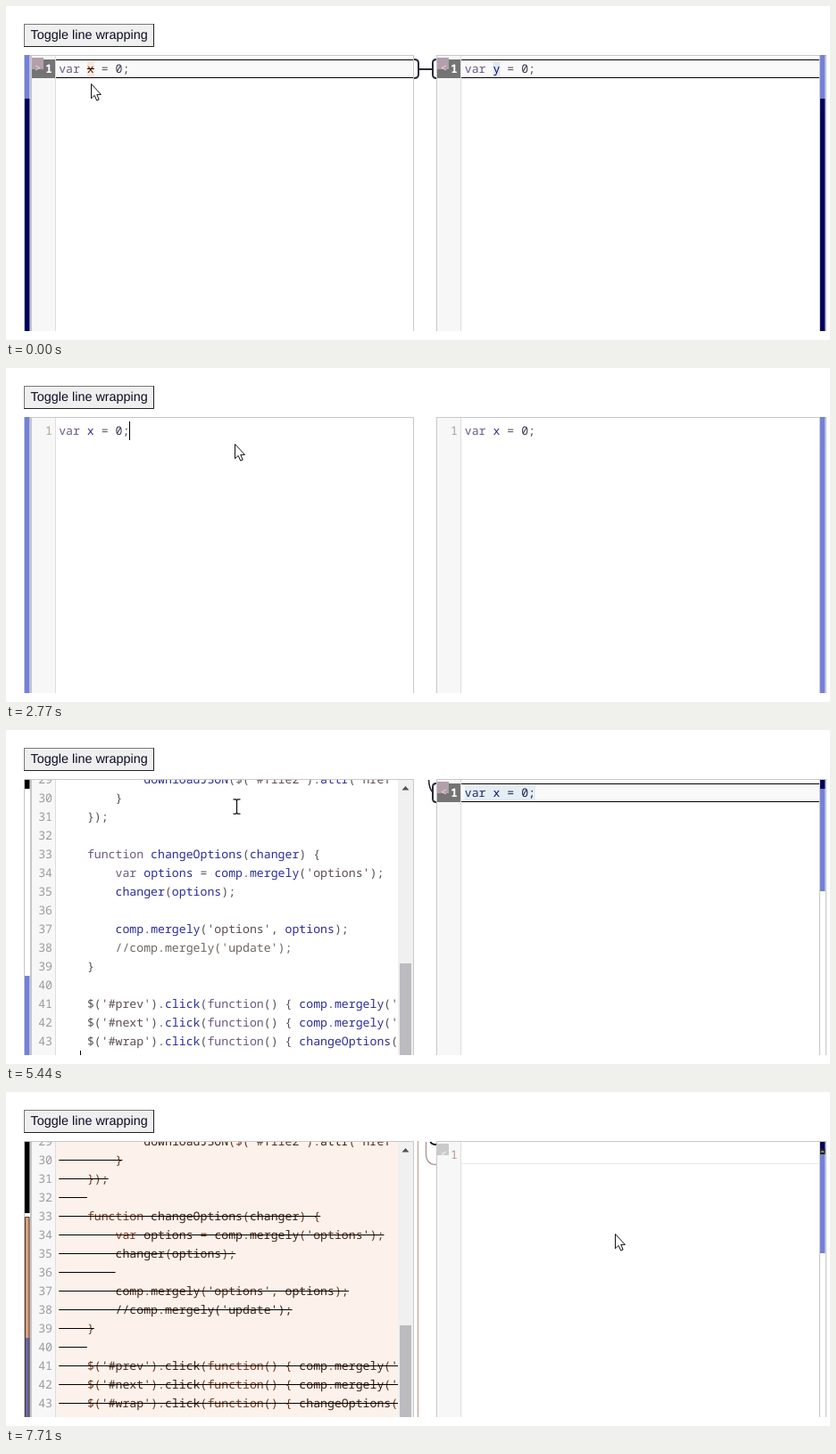
An HTML page for the animation above (8000 ms loop, 923 px wide and 375 px high).

```html
<!DOCTYPE html>
<html lang="en">
<head>
<meta charset="utf-8">
<title>Merge editor</title>
<style>
  html, body { margin: 0; width: 100%; height: 100%; overflow: hidden; background: #fff; }
  svg { display: block; }
  text { white-space: pre; text-rendering: geometricPrecision; }
  .code { font: 13.2px "Noto Sans Mono", monospace; }
  .bold { font-weight: 700; }
  .ui { font: 14.4px "Liberation Sans", Arial, sans-serif; }
</style>
</head>
<body>
<svg id="stage" width="923" height="375" viewBox="0 0 923 375">
  <defs>
    <clipPath id="view"><rect width="923" height="365"/></clipPath>
    <clipPath id="panes"><rect x="29" y="56" width="410" height="309"/></clipPath>
  </defs>
  <rect x="20.5" y="20.5" width="145" height="25" fill="#efefef" stroke="#777"/>
  <path d="M20 45.5H165.5V20" fill="none" stroke="#222"/>
  <text class="ui" x="27.6" y="37" fill="#0c0c24">Toggle line wrapping</text>
  <g id="scene" clip-path="url(#view)"></g>
  <g id="pointer" stroke="#111" stroke-linejoin="round">
    <path id="arrow" fill="#fff" d="M0 0V16.3L3.7 12.9 6.2 18.6 8.7 17.5 6.3 11.9H11Z"/>
    <path id="beam" fill="none" stroke-width="1.3" d="M-4 -8.2H-1.2L0 -7 1.2 -8.2H4M0 -7V7M-4 8.2H-1.2L0 7 1.2 8.2H4"/>
    <g id="hand" stroke-width="1.2">
      <path fill="#fff" d="M-1.5 13V2Q-1.5 .2 .3 .2 2.2 .2 2.2 2V8Q4.4 6.6 5.6 8.6 7.8 7.6 8.8 9.6 11.6 9 11.6 12V16Q11.6 19 9.6 22.4H.8Q-1 18.5 -4.8 14.8 -6.4 11.4 -3.6 11.4Z"/>
      <path fill="none" d="M2.2 8V12M5.6 9V12.4M8.8 10V12.8"/>
    </g>
  </g>
</svg>
<script>
const LOOP = 8000, CHAR = 7.92, ROW = 21, LEFT = 59.2, RIGHT = 513.8;
const BLUE = '#7480da', NAVY = '#00005c', DARK = '#2a2a3a', FADED = '#b39c9c';
const scene = document.getElementById('scene');
const parts = [];

const SOURCE = [
  "            downloadJSON($('#file2').attr('href'",
  "        }",
  "    });",
  "    ",
  "    function changeOptions(changer) {",
  "        var options = comp.mergely('options');",
  "        changer(options);",
  "        ",
  "        comp.mergely('options', options);",
  "        //comp.mergely('update');",
  "    }",
  "    ",
  "    $('#prev').click(function() { comp.mergely('prev');",
  "    $('#next').click(function() { comp.mergely('next');",
  "    $('#wrap').click(function() { changeOptions(",
  "   "
];
const rows = SOURCE.map((code, i) => ({ code, n: 29 + i, y: 45 + i * ROW }));

const PLAIN = { comment: '#6f6560', string: '#5c4c50', keyword: '#6a5a82', number: '#383a4c', name: '#2c2c98', sign: '#55505c' };
const MUTED = { ...PLAIN, name: '#5a1c10' };
const ADDED = { keyword: '#28285e', number: '#20204c', name: '#101060', sign: '#28284c' };
const REMOVED = { comment: '#3c2418', string: '#4c2c20', keyword: '#7c3c20', number: '#3c2418', name: '#3c2014', sign: '#6c3820' };

const rect = (x, y, w, h, fill) => `<rect x="${x}" y="${y}" width="${w}" height="${h}" fill="${fill}"/>`;
const line = (d, color, w = 2) => `<path d="${d}" fill="none" stroke="${color}" stroke-width="${w}"/>`;

// Adds markup that is visible during the given [from, to) spans.
function part(spans, markup) {
  const el = document.createElementNS('http://www.w3.org/2000/svg', 'g');
  el.innerHTML = markup;
  scene.append(el);
  parts.push({ el, spans });
}

function kind(token) {
  if (token.startsWith('//')) return 'comment';
  if (token[0] === "'") return 'string';
  if (/^(var|function)$/.test(token)) return 'keyword';
  if (/^\d/.test(token)) return 'number';
  return /^\w/.test(token) ? 'name' : 'sign';
}

function code(x, y, source, colors) {
  const body = source.trimStart();
  const start = x + (source.length - body.length) * CHAR;
  const spans = (body.match(/\/\/.*|'[^']*'?|\w+|\s+|[^\w\s]/g) || [])
    .map(t => `<tspan fill="${colors[kind(t)]}">${t}</tspan>`).join('');
  return `<text class="code" x="${start}" y="${y + 15}">${spans}</text>`;
}

const number = (x, y, n, fill, bold = '') =>
  `<text class="code ${bold}" x="${x}" y="${y + 15}" text-anchor="end" fill="${fill}">${n}</text>`;

const pane = (x, w) =>
  rect(x, 55, w, 320, '#c8c8c8') + rect(x + 1, 56, w - 2, 319, '#fff') +
  rect(x + 1, 56, 26, 319, '#f7f7f7') + rect(x + 27, 56, 1, 319, '#ddd');

const mergeButton = (x, sign, fill, ink) =>
  rect(x + 1, 58, 13, 13, fill) + line(sign > 0 ? `M${x + 5} 67l5 2.5-5 2.5` : `M${x + 11} 67l-5 2.5 5 2.5`, ink, 1);

const markedRow = (x, w, sign) =>
  rect(x + 28, 60, w, ROW, '#f9f9f9') + rect(x + 28, 60, w, 1, '#000') + rect(x + 28, 80, w, 1, '#000') +
  rect(x + 1, 60, 26, ROW, '#747474') + mergeButton(x, sign, '#b39fac', '#e4d4dc') +
  number(x + 24, 60, 1, '#fff', 'bold');

const gauge = x => rect(x, 55, 8, 310, '#c4c4c4') + rect(x + 1, 56, 6, 309, '#fff');
const bar = (x, ...bands) => bands.map(([y, end, fill]) => rect(x, y, 5.5, end - y, fill)).join('');
const caret = (x, y = 60) => rect(x, y, 1, ROW, '#000');
const mark = (x, y, len, fill) => rect(x, y + 2, len * CHAR, 17, fill);
const strike = (x, y, len) => rect(x, y + 10, len * CHAR, 1, '#000');

const rightBracket = line('M482 60Q478 60 478 64V77Q478 81 482 81', DARK);
const leftBracket = line('M457 60Q462 60 462 64V77Q462 81 457 81M462 71H478', DARK);

// Frames of both panes and their overview bars
part([[0, LOOP]], gauge(20) + gauge(911) + pane(28, 429) + pane(482, 430) + gauge(911));

const marked = [[0, 1720], [5180, 5440]];
for (const x of [21, 912]) {
  part(marked, bar(x, [55, 104, BLUE], [104, 365, NAVY]));
  part([[1720, 5180]], bar(x, [55, 365, BLUE]));
}
part([[5440, 5710]], bar(21, [56, 66, '#000'], [276, 365, BLUE]));
part([[5710, 7450]], bar(21, [56, 276, '#000'], [276, 365, NAVY]));
part([[7450, LOOP]], bar(21, [56, 136, '#000'], [140, 276, '#d8a27c'], [276, 365, '#6a68a2']) +
  line('M21.5 365V140.5H26V365', '#4a3c3c', 1));
part([[5440, LOOP]], bar(912, [56, 66, NAVY], [66, 181, BLUE]));
part([[7450, LOOP]], bar(912, [64, 70, '#222']) + rect(913, 66, 3, 2, '#888'));

// Left pane, single line
part(marked, markedRow(28, 400, 1) + leftBracket + rightBracket);
part([[1720, 5180]], number(52, 60, 1, FADED));
part([[4650, 5050]], rect(59, 60, 79, 20, '#d9d9d9'));
part([[0, 1720]], mark(LEFT + 4 * CHAR, 60, 1, '#fde6d8') +
  code(LEFT, 60, 'var x = 0;', MUTED) + strike(LEFT + 4 * CHAR, 60, 1));
part([[1720, 5050]], code(LEFT, 60, 'var x = 0;', PLAIN));
part([[2770, 3330], [3860, 4390]], caret(138));
part([[5050, 5440]], caret(59));

// Right pane
part([[0, 1720], [5180, 7450]], markedRow(482, 401, -1));
part([[1720, 5180]], number(506, 60, 1, FADED));
part([[7450, LOOP]], rect(510, 80, 401, 1, '#e8e8e8') + mergeButton(482, -1, '#cacaca', '#f4f4f4') + number(506, 60, 1, '#b8968a'));
part([[0, 1460]], mark(RIGHT + 4 * CHAR, 60, 1, '#dfe9f4') + code(RIGHT, 60, 'var y = 0;', { ...PLAIN, name: '#101060' }));
part([[1460, 5180]], code(RIGHT, 60, 'var x = 0;', PLAIN));
part([[5180, 7180]], mark(RIGHT, 60, 10, '#e4eef4'));
part([[6780, 7180]], rect(514, 60, 79, 20, '#d9d9d9'));
part([[5180, 7180]], code(RIGHT, 60, 'var x = 0;', ADDED));
part([[6380, 6780]], caret(593));
part([[7180, 7710]], caret(514));

// Pasted listing
const listing = markup => `<g clip-path="url(#panes)">${rows.map(markup).join('')}</g>`;
const normal = [[5440, 5710], [7450, LOOP]];
part([[5440, LOOP]], rect(29, 56, 26, 309, '#f7f7f7') + rect(56, 56, 383, 309, '#fff'));
part([[5710, 7450]], rect(29, 56, 26, 309, '#747474') + rect(56, 56, 383, 309, '#f9f9f9') +
  listing(r => mark(LEFT, r.y, r.code.length, '#fdf1e9') + number(52, r.y, r.n, '#fff', 'bold')));
part([[7450, LOOP]], rect(56, 56, 383, 309, '#fdf2eb'));
part(normal, listing(r => number(52, r.y, r.n, '#9c9c9c')));
part([[5440, 5710]], listing(r => code(LEFT, r.y, r.code, PLAIN)));
part([[5710, LOOP]], listing(r => code(LEFT, r.y, r.code, REMOVED) + strike(LEFT, r.y, r.code.length)));
part([[5440, LOOP]], rect(439, 56, 17, 309, '#f0f0f1') + rect(441, 262, 13, 103, '#bcbcc0') +
  '<path d="M443.5 67.5L447.5 63 451.5 67.5Z" fill="#505050"/>');
part([[5440, 5990]], caret(83, 360));

// Connectors between the panes
part([[5440, 7450]], rightBracket + line('M473.5 56Q474 66 478 70', DARK, 1.6));
part([[5710, 7450]], line('M462 55V365', DARK));
part([[7450, LOOP]], line('M461.5 55V365', '#c8aca4', 1.5) + line('M470.5 56V70Q471 81.5 482 81.5', '#b09490', 1.4) +
  line('M475.5 56Q476.5 59 482 59', '#111'));

// Pointer stops: time, shape, x, y
const stops = [
  [0, 'arrow', 95.5, 87.5], [130, 'beam', 99, 78], [260, 'beam', 98, 73],
  [530, 'beam', 92, 76], [660, 'arrow', 76, 82], [790, 'arrow', 56, 84],
  [920, 'hand', 42, 76], [1070, 'hand', 40, 76], [1200, 'hand', 38.5, 74.5],
  [1850, 'arrow', 39.5, 75.5], [2120, 'arrow', 62.5, 84.5], [2250, 'arrow', 140.5, 118.5],
  [2380, 'arrow', 235.5, 150.5], [2510, 'arrow', 288.5, 157.5], [2640, 'arrow', 268.5, 108.5],
  [2770, 'arrow', 256.5, 85.5], [5440, 'beam', 258.5, 86], [5990, 'beam', 408.5, 96],
  [6120, 'arrow', 659.5, 140.5], [6260, 'arrow', 676.5, 155.5], [6380, 'arrow', 682.5, 159.5]
];
const pointer = document.getElementById('pointer');
const shapes = ['arrow', 'beam', 'hand'].map(id => document.getElementById(id));
const show = (el, on) => { el.style.display = on ? '' : 'none'; };

function draw(t) {
  for (const { el, spans } of parts) show(el, spans.some(([a, b]) => t >= a && t < b));
  const [, shape, x, y] = stops.filter(s => s[0] <= t).pop();
  pointer.setAttribute('transform', `translate(${x} ${y})`);
  for (const el of shapes) show(el, el.id === shape);
}

const begin = performance.now();
function tick() {
  draw((performance.now() - begin) % LOOP);
  requestAnimationFrame(tick);
}
draw(0);
requestAnimationFrame(tick);
</script>
</body>
</html>
```
